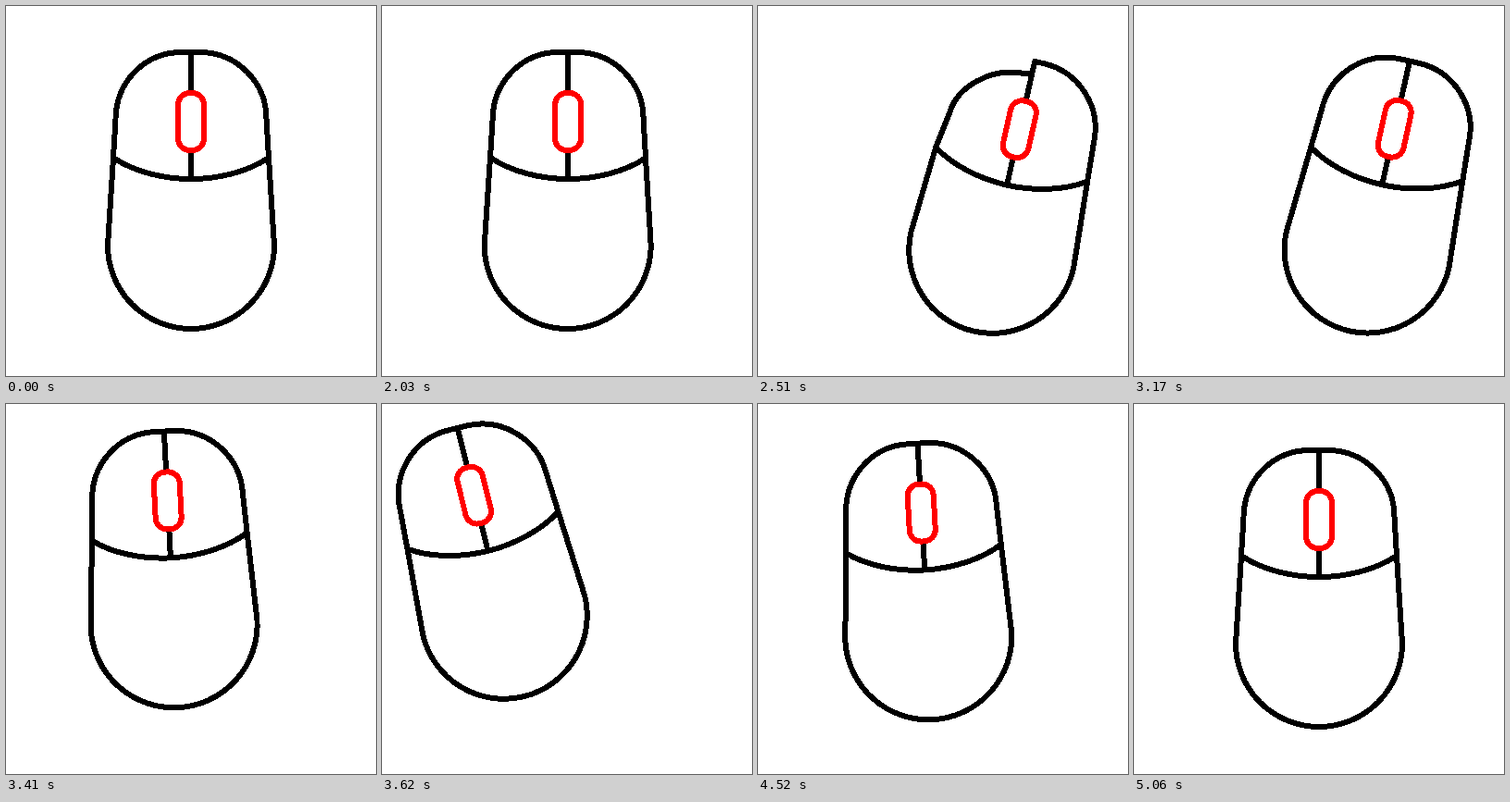
Recreate the animation shown at these times as an HTML page. Size 400 by 400 pixels, loop 5.09 s.

```html
<!DOCTYPE html>
<html lang="en">
<head>
<meta charset="utf-8">
<title>Mouse clicks</title>
<style>
  html, body { margin: 0; width: 100%; height: 100%; overflow: hidden; background: #fff; }
  svg { display: block; width: 100vw; height: 100vh; }
  path, rect { fill: #fff; stroke: #000; stroke-width: 6; stroke-linejoin: round; shape-rendering: crispEdges; }
  .wheel { stroke: #f00; }
</style>
</head>
<body>
<svg viewBox="0 0 400 400">
  <g id="mouse">
    <path id="button"/>
    <path d="M284 164L281.5 122A72 72 0 0 0 210 50H200V187C230 187 262 179 284 164Z"/>
    <path d="M116 164L110 259A90 90 0 0 0 290 259L284 164C262 179 230 187 200 187C170 187 138 179 116 164Z"/>
    <rect class="wheel" x="186" y="94" width="28" height="62" rx="12.5"/>
  </g>
</svg>
<script>
const LOOP = 5090, STEP = 30, PHASE = 20;

// Pose: offset x, offset y, angle about (200, 450).
const home = [0, 0, 0], right = [11.3, 0.2, 12.7], left = [-23.9, -37.3, -15];
const moves = [
  { start: 2000, end: 2390, from: home, to: right },
  { start: 3140, end: 3740, from: right, to: left },
  { start: 4220, end: 4730, from: left, to: home }
];
const clicks = [2390, 2720, 3740, 4730];

// Outer edge of the left button: knee, two curve handles, curve end, tip.
const raised = [118.5, 122, 119, 82, 150, 50, 190, 50, 200, 50];
const pressed = [122.4, 124, 124, 96, 154, 67, 190, 65.3, 200, 64];

const mouse = document.getElementById('mouse');
const button = document.getElementById('button');

const clamp = x => Math.min(1, Math.max(0, x));
const smooth = x => x * x * (3 - 2 * x);
const mix = (from, to, k) => from.map((a, i) => a + (to[i] - a) * k);

// Same as cubic-bezier(0.4, 0, 0.38, 1), solved by bisection.
function ease(x) {
  let lo = 0, hi = 1;
  for (let i = 0; i < 24; i++) {
    const u = (lo + hi) / 2, v = 1 - u;
    if (1.2 * u * v * v + 1.14 * u * u * v + u * u * u < x) lo = u; else hi = u;
  }
  return smooth((lo + hi) / 2);
}

function poseAt(t) {
  const m = moves.filter(m => t >= m.start).pop();
  return m ? mix(m.from, m.to, ease(clamp((t - m.start) / (m.end - m.start)))) : home;
}

function pressAt(t) {
  const start = clicks.filter(c => t >= c).pop();
  if (start === undefined) return 0;
  const dt = t - start;
  return smooth(clamp(dt / 120)) - smooth(clamp((dt - 180) / 150));
}

function buttonPath(press) {
  const p = mix(raised, pressed, press);
  return `M116 164L${p.slice(0, 2)}C${p.slice(2, 8)}L${p.slice(8)}V187C170 187 138 179 116 164Z`;
}

function draw(ms) {
  const t = Math.floor((ms % LOOP - PHASE) / STEP) * STEP + PHASE;
  const [x, y, angle] = poseAt(t);
  mouse.setAttribute('transform', `translate(${x} ${y}) rotate(${angle} 200 450)`);
  button.setAttribute('d', buttonPath(pressAt(t)));
}

const origin = performance.now();
function tick() {
  draw(performance.now() - origin);
  requestAnimationFrame(tick);
}
tick();
</script>
</body>
</html>
```
